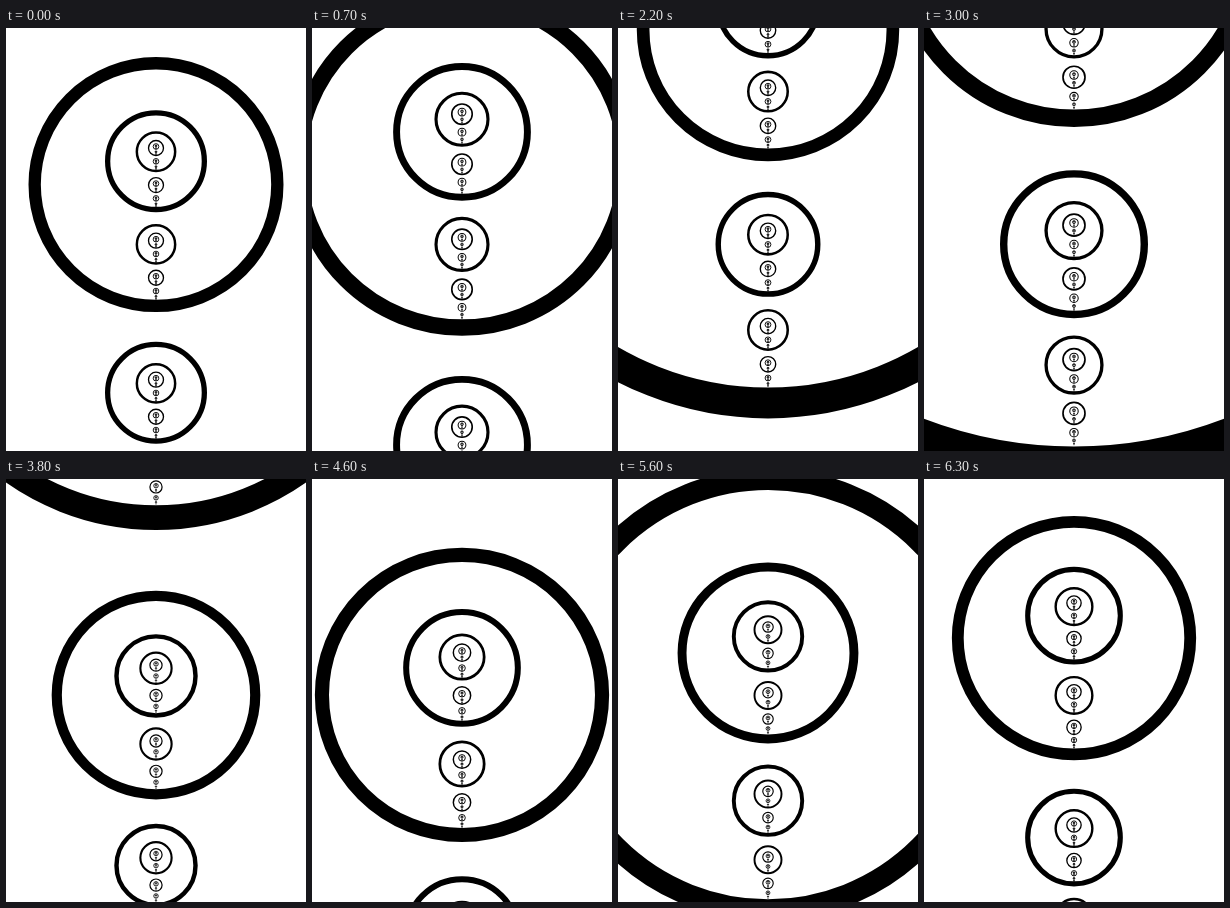
An HTML page with a canvas that plays this animation: 300x423 px, repeating every 6400 ms.

```html
<!DOCTYPE html>
<html lang="en">
<head>
<meta charset="utf-8">
<title>Nested rings</title>
<style>
  html, body { margin: 0; width: 100%; height: 100%; overflow: hidden; background: #fff; }
  canvas { display: block; }
</style>
</head>
<body>
<canvas id="stage" width="300" height="423"></canvas>
<script>
const ctx = document.getElementById('stage').getContext('2d');
const W = 300, H = 423;
const LOOP = 6400, STEP = 100;

// Proportions relative to a ring's outer radius
const RATIO = 0.4;       // next ring in a chain, and first ring inside
const SPACING = 1.633;   // centre distance to the next ring of the chain
const LIFT = 0.184;      // how far the first inner ring sits above centre
const STROKE = 0.092;
const EXTRA_STROKE = 0.6, MIN_DOT = 0.6, MIN_RADIUS = 0.2; // pixels

// Three levels of zoom bring the great-grandchild onto its ancestor
const ZOOM = RATIO ** -3;
const FOCUS_Y = 216.5, START_RADIUS = 318.75;
const childShift = RATIO ** 2 * SPACING - (1 + RATIO) * LIFT;
const DRIFT = childShift / (1 - 1 / ZOOM);

function ring(y, r) {
  if (y + r < 0 || y - r > H) return;
  const outer = Math.max(r, MIN_DOT);
  const width = Math.min(STROKE * r + EXTRA_STROKE, outer);
  ctx.lineWidth = width;
  ctx.beginPath();
  ctx.arc(W / 2, y, outer - width / 2, 0, 2 * Math.PI);
  ctx.stroke();
  chain(y - LIFT * r, r * RATIO);
}

function chain(y, r) {
  for (; r > MIN_RADIUS; r *= RATIO) {
    ring(y, r);
    y += SPACING * r;
  }
}

function draw() {
  const t = Math.floor(performance.now() % LOOP / STEP) * STEP;
  const radius = START_RADIUS * ZOOM ** (t / LOOP);
  ctx.fillStyle = '#fff';
  ctx.fillRect(0, 0, W, H);
  ctx.strokeStyle = '#000';
  ring(FOCUS_Y - DRIFT * radius, radius);
  requestAnimationFrame(draw);
}
draw();
</script>
</body>
</html>
```
